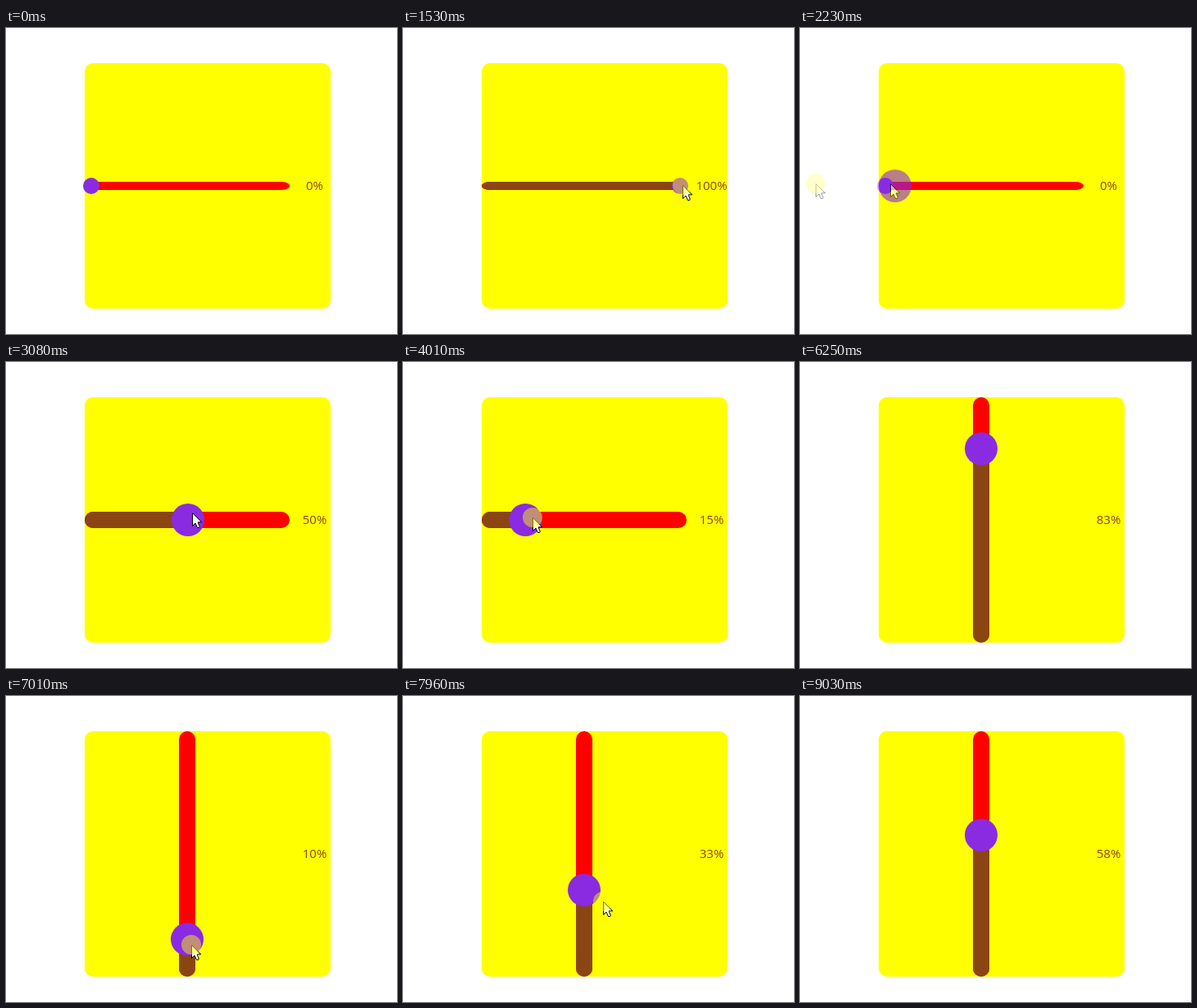
An HTML page for the animation above (9.81 s loop, 477 by 374 pixels).

```html
<!DOCTYPE html>
<html>
<head>
<meta charset="utf-8">
<style>
  html, body { margin: 0; width: 100%; height: 100%; overflow: hidden; background: #fff; }
  svg { display: block; width: 477px; height: 374px; }
  text { font: 15px "Open Sans", "Noto Sans", sans-serif; text-anchor: middle; }
</style>
</head>
<body>
<svg id="stage" viewBox="0 0 477 374"></svg>
<script>
const LOOP = 9810, FADE = 310, FADE_STEPS = 4, LAG = 10;
const stage = document.getElementById('stage');

// Each clip: slider style, time span of the drag, and the pointer's path as [time, x, y].
// Knob positions run from lo (0%) to hi (100%); grab is the pointer's offset from the knob.
const CLIPS = [
  { start: 0, r: 10, thick: 10, lo: 104, hi: 338, grab: 0, press: [1000, 2000], hide: 2000,
    path: [[70, 415, 350], [1000, 96, 193], [1520, 341, 192], [1680, 341, 192], [1850, 19, 190]] },
  { start: 2000, r: 20, thick: 10, lo: 116, hi: 326, grab: 5, press: [2310, 2540], hide: 2540,
    path: [[2000, 110, 190], [2310, 110, 190], [2540, 227, 190]] },
  { start: 2770, r: 20, thick: 20, lo: 116, hi: 326, grab: 5, press: [3400, 4640], hide: 5180,
    path: [[2770, 234, 133], [3080, 227, 184], [3400, 227, 188], [3850, 102, 190],
           [4410, 296, 190], [4640, 296, 190], [5180, 387, 333]] },
  { start: 5940, upright: true, r: 20, thick: 20, lo: 325.3, hi: 61.3, grab: 1,
    press: [6700, 8810], hide: 9030,
    path: [[6400, 260, 342], [6700, 226, 107], [7010, 226, 304], [7170, 226, 342],
           [7400, 230, 329], [7640, 240, 8], [7790, 240, 8], [7960, 244, 251],
           [8250, 246, 283], [8810, 237, 171], [8960, 256, 191]] }
];

const clamp = (v, a, b) => Math.min(b, Math.max(a, v));

function along(path, t) {
  const i = path.findIndex(k => k[0] > t);
  if (i < 1) return path.at(i).slice(1);
  const [t0, x0, y0] = path[i - 1], [t1, x1, y1] = path[i];
  const p = (t - t0) / (t1 - t0);
  return [x0 + (x1 - x0) * p, y0 + (y1 - y0) * p];
}

// The knob follows the pointer during the drag and rests before and after it.
function valueAt(clip, t) {
  const [x, y] = along(clip.path, clamp(t - LAG, ...clip.press));
  const at = (clip.upright ? y : x) - clip.grab;
  return clamp((at - clip.lo) / (clip.hi - clip.lo), 0, 1);
}

const rect = (x, y, w, h, fill, rx, ry = rx) =>
  `<rect x="${x}" y="${y}" width="${w}" height="${h}" rx="${rx}" ry="${ry}" fill="${fill}"/>`;
const circle = (x, y, r, fill, opacity = 1) =>
  `<circle cx="${x}" cy="${y}" r="${r}" fill="${fill}" fill-opacity="${opacity}"/>`;

function slider({ upright, r, thick, lo, hi }, value) {
  const knob = lo + (hi - lo) * value;
  const [x, y] = upright ? [221, knob] : [knob, 193];
  const bar = fill => upright
    ? rect(211, 43, thick, 300, fill, 10)
    : rect(96, 193 - thick / 2, 250, thick, fill, 10, thick / 2);
  // the filled part is the same bar cut off at the knob
  const cut = upright ? `${y}px 0 0 0` : `0 ${477 - x}px 0 0`;
  return bar('red') +
    `<g style="clip-path: inset(${cut}) view-box">${bar('saddlebrown')}</g>` +
    circle(x, y, r, 'blueviolet');
}

function pointer({ path, press, hide }, t) {
  if (t < path[0][0] || t >= hide) return '';
  const [x, y] = along(path, t).map(Math.round);
  const arrow = `<path transform="translate(${x} ${y})" fill="#fff" stroke="#000"
    d="M.5.5V16.5L4 13 6.5 18.5H8.5L9.3 17 7.3 12.5V11.8H11.7Z"/>`;
  return arrow + (t >= press[0] && t < press[1] ? circle(x, y, 12, '#ff0', .47) : '');
}

function scene(clip, t) {
  const value = valueAt(clip, t);
  return rect(0, 0, 477, 374, '#fff', 0) + rect(96, 43, 300, 300, '#ff0', 10) +
    slider(clip, value) +
    `<text x="376.5" y="198" fill="saddlebrown">${Math.floor(value * 100 + 1e-6)}%</text>` +
    pointer(clip, t);
}

function draw(now) {
  const t = now % LOOP;
  const i = CLIPS.findLastIndex(c => c.start <= t), clip = CLIPS[i];
  const step = Math.floor((t - clip.start) / FADE * FADE_STEPS) + 1;
  stage.innerHTML = i && step <= FADE_STEPS
    ? scene(CLIPS[i - 1], clip.start - 1) +
      `<g opacity="${step / (FADE_STEPS + 1)}">${scene(clip, t)}</g>`
    : scene(clip, t);
  requestAnimationFrame(draw);
}
draw(0);
</script>
</body>
</html>
```
